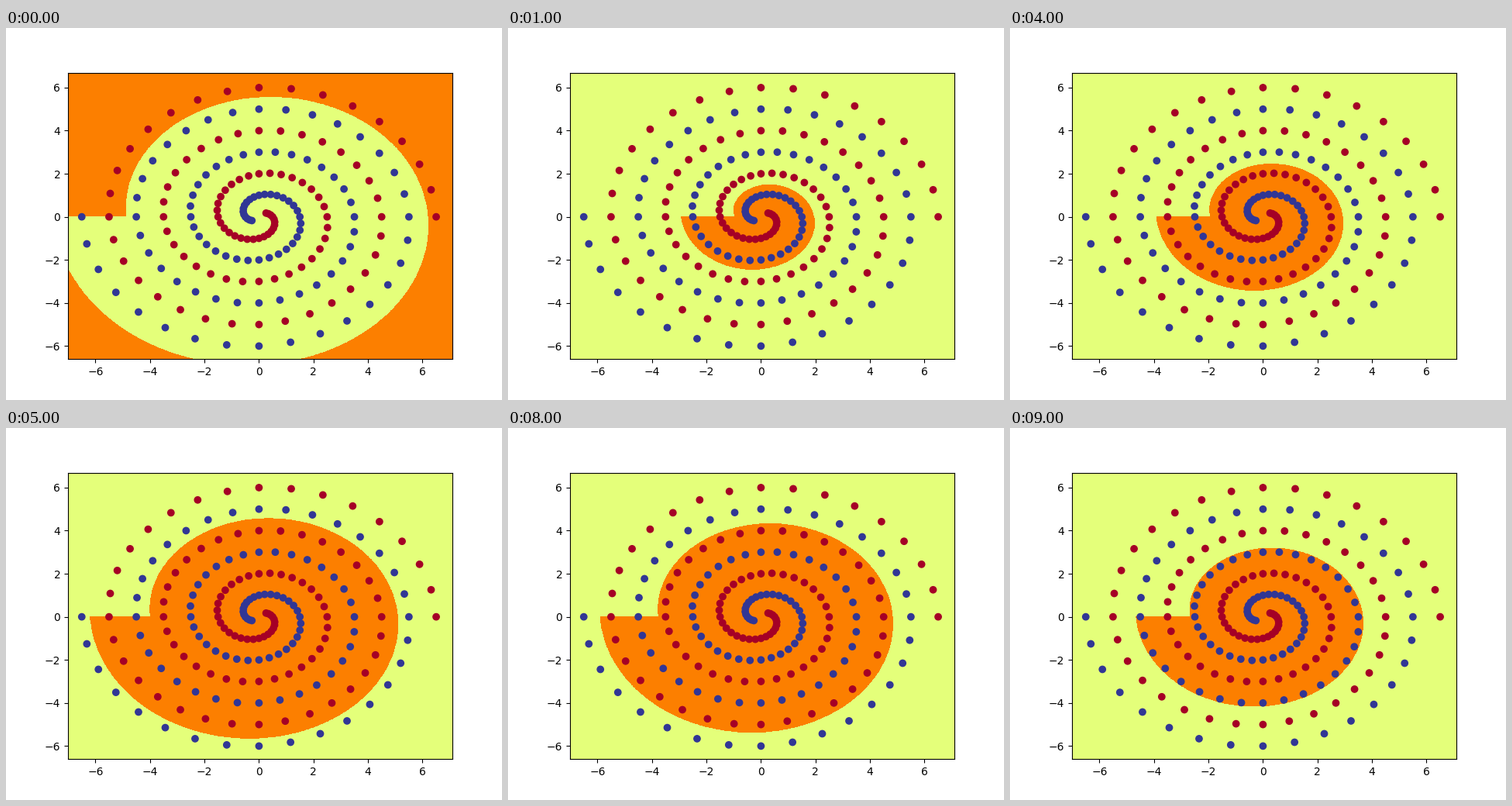
These frames come from a looping animation (640 px wide and 480 px high, 10 s). A matplotlib script:

```python
import numpy as np
import matplotlib.pyplot as plt
from matplotlib.animation import FuncAnimation

STEP = 0.01
HALF = STEP / 2

# Where each hidden unit's boundary crosses the positive x axis
OFFSETS = [6.2, 1.95, -0.1, -0.1, 2.93, 5.1, 2.1, 0.92, 4.84, 3.67]


def grid_axis(start, stop):
    n = round((stop - start) / STEP)
    return start + STEP * np.arange(n)


def boundary(offset):
    """Archimedean arm that winds faster the further it is from mid-range."""
    slope = 0.314 + 0.00264 * abs(offset - 2.7) ** 3
    return offset - slope * angle


def unit_map(i):
    within = radius < boundary(OFFSETS[i])
    # The outermost unit fires outside its arm, all others inside
    return ~within if OFFSETS[i] == max(OFFSETS) else within


def spiral(n=100):
    i = np.arange(n)
    r = 6.5 * (104 - i) / 104
    a = i * np.pi / 16
    return r * np.cos(a), r * np.sin(a)


xs = grid_axis(-7, 7.1)
ys = grid_axis(-6.6, 6.7)
gx, gy = np.meshgrid(xs, ys)
radius = np.hypot(gx, gy)
angle = np.arctan2(gy, gx)
extent = (xs[0] - HALF, xs[-1] + HALF, ys[0] - HALF, ys[-1] + HALF)

fig, ax = plt.subplots(figsize=(6.4, 4.8), dpi=100)
field = ax.imshow(unit_map(0).astype(float), cmap="Wistia", vmin=0, vmax=1,
                  origin="lower", extent=extent, aspect="auto",
                  interpolation="nearest")

px, py = spiral()
ax.scatter(np.r_[px, -px], np.r_[py, -py], c=np.repeat([0, 1], len(px)),
           cmap="RdYlBu", zorder=2)
ax.set_xlim(extent[:2])
ax.set_ylim(extent[2:])


def update(i):
    field.set_data(unit_map(i).astype(float))
    return (field,)


anim = FuncAnimation(fig, update, frames=len(OFFSETS), interval=1000,
                     repeat=True, repeat_delay=0)
plt.show()
```
